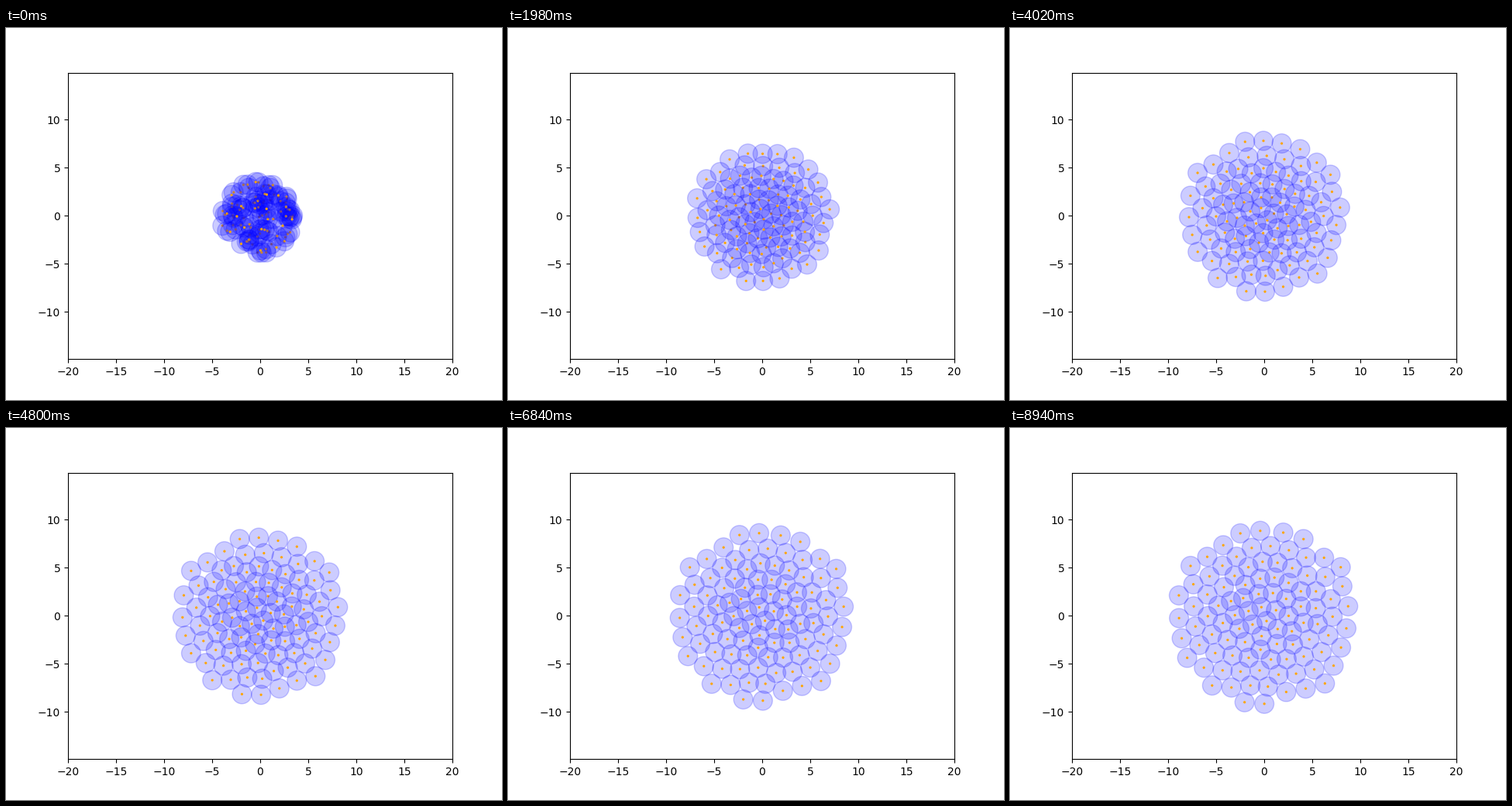
Write a matplotlib script that moves like this. It is 640 px wide and 480 px high and loops after 9 s.

```python
import numpy as np
import matplotlib.pyplot as plt
from matplotlib.animation import FuncAnimation
from matplotlib.collections import EllipseCollection
from matplotlib.colors import to_rgba

COUNT, FRAMES, STEP = 100, 150, 60
REACH, GAIN, MAX_PUSHES = 2.05, 0.004, 100
BALL, DOT = 2.0, 0.15  # diameters


def cluster_radius(t):
    """Half extent of the cluster of centres after t seconds."""
    return 9.25 - 4.35 * np.exp(-t / 3.54) - 1.07 * np.exp(-t / 0.35)


def crowd(rng):
    """Random centres spread evenly over a small disc."""
    r = cluster_radius(0) * np.sqrt(rng.random(COUNT))
    a = rng.uniform(0, 2 * np.pi, COUNT)
    p = np.column_stack([r * np.cos(a), r * np.sin(a)])
    return p - p.mean(axis=0)


def push(p):
    """Overlapping balls drive each other apart like soft springs."""
    d = p[:, None] - p[None]
    dist = np.hypot(d[..., 0], d[..., 1])
    np.fill_diagonal(dist, REACH)
    force = np.clip(REACH - dist, 0, None) / np.maximum(dist, 0.01)
    return p + GAIN * (force[..., None] * d).sum(axis=1)


def simulate():
    """Let the crowd repel itself until each frame's radius is reached."""
    p = crowd(np.random.default_rng(12))
    path = [p]
    for i in range(1, FRAMES):
        goal = cluster_radius(i * STEP / 1000)
        for _ in range(MAX_PUSHES):
            if np.ptp(p, axis=0).mean() / 2 >= goal:
                break
            p = push(p)
        path.append(p)
    return path


path = simulate()

fig, ax = plt.subplots(figsize=(6.4, 4.8), dpi=100)
box = ax.get_position()
half_height = 20 * (box.height * 4.8) / (box.width * 6.4)
ax.set_xlim(-20, 20)
ax.set_ylim(-half_height, half_height)

# Each ball is followed by its own dot, so later balls veil earlier dots
sizes = np.tile([BALL, DOT], COUNT)
colors = [to_rgba("blue", 0.2), to_rgba("orange")] * COUNT
balls = EllipseCollection(sizes, sizes, np.zeros(2 * COUNT), units="xy",
                          offsets=np.repeat(path[0], 2, axis=0),
                          offset_transform=ax.transData,
                          facecolors=colors, edgecolors=colors, linewidths=1)
ax.add_collection(balls, autolim=False)


def update(i):
    balls.set_offsets(np.repeat(path[i], 2, axis=0))
    return [balls]


anim = FuncAnimation(fig, update, frames=FRAMES, interval=STEP, repeat=True,
                     repeat_delay=0, blit=False)
plt.show()
```
